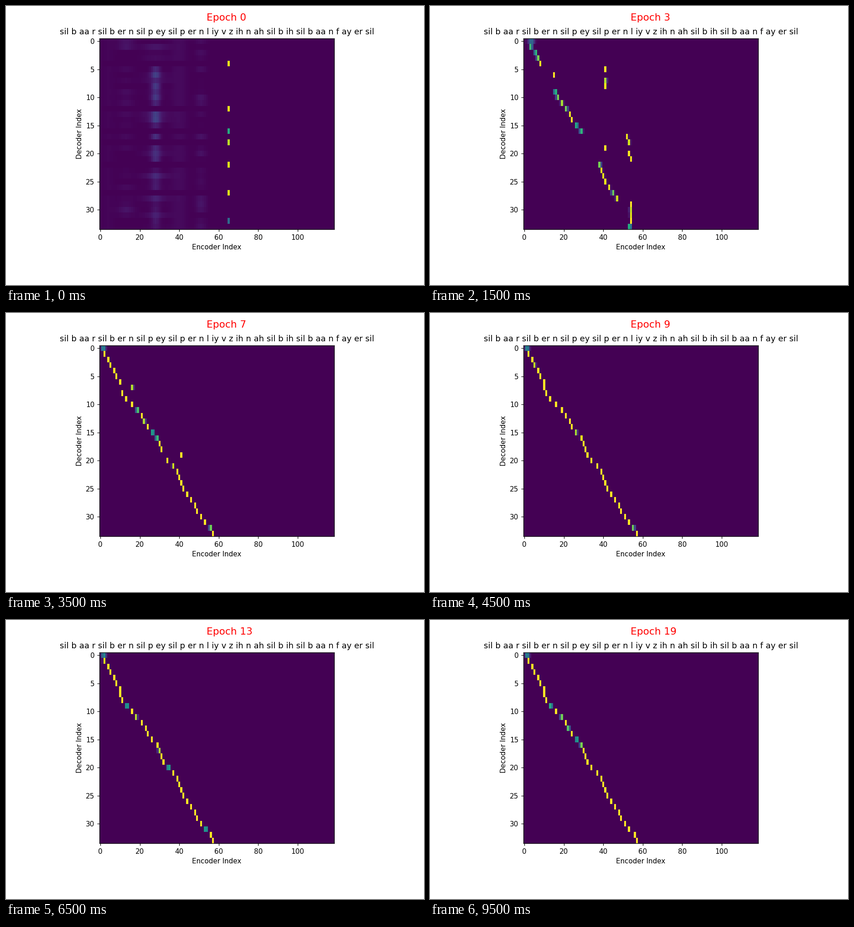
These frames come from a looping animation (917x611 px, 10000 ms). A matplotlib script:

```python
import numpy as np
import matplotlib.pyplot as plt
from matplotlib.animation import FuncAnimation

W, H, DPI = 917, 611, 100
ROWS, COLS, EPOCHS = 34, 119, 20
PHONES = ("sil b aa r sil b er n sil p ey sil p er n l iy v z ih n ah "
          "sil b ih sil b aa n f ay er sil")

plt.rcParams.update({
    "font.family": "DejaVu Sans", "font.size": 10.9,
    "axes.linewidth": 0.87, "axes.titlesize": 12.93, "axes.titlepad": 6.5,
    "axes.labelpad": 4.3,
    "xtick.major.size": 3.8, "ytick.major.size": 3.8,
    "xtick.major.pad": 3.8, "ytick.major.pad": 3.8,
    "xtick.major.width": 0.87, "ytick.major.width": 0.87,
})

rows = np.arange(ROWS)
cells = np.arange(COLS)

# The learned alignment bends at these (row, cell) points.
BENDS = [(0, 1.5), (1, 2), (2, 4), (5, 8), (6, 10), (7, 10), (8, 10.9),
         (12, 21), (14, 24.1), (16, 28.7), (19, 32), (22, 39), (25, 42),
         (28, 48), (29, 49), (32, 55.7), (33, 57)]
PATH = np.interp(rows, *zip(*BENDS))

# Cells that attract rows which have not found their place yet.
ANCHORS = np.array([16.4, 41, 53.3])

# Strong first guesses before training, all at one cell.
SPIKE_CELL = 65
SPIKES = {4: .97, 12: .97, 16: .62, 18: .9, 22: .95, 27: .95, 32: .35}


def bump(centre, sigma):
    return np.exp(-((cells - centre) / sigma) ** 2 / 2)


def untrained_map():
    rng = np.random.default_rng(4)
    free = np.array([SPIKES.get(r, 0) < 0.5 for r in rows])

    def band(centre, sigma, strength):
        return np.outer(strength * free, bump(centre, sigma))

    ridge = (rows > 3) * (0.23 - 0.005 * rows) * rng.uniform(0.2, 1, ROWS)
    grid = band(28, 1.6, ridge) + band(40, 3, 0.025) + band(4, 2.5, 0.012)
    for centre, sigma, peak in ((28, 5, .06), (13, 3, .06), (51, 2, .06)):
        grid += band(centre, sigma, peak * rng.random(ROWS) ** 2)
    for row, value in SPIKES.items():
        grid[row, SPIKE_CELL] = value
    return grid


def trained_map(epoch):
    rng = np.random.default_rng(epoch)
    tilt = 1.7 * np.exp(3 - epoch) * (1 - rows / 16)
    centres = PATH + tilt + rng.normal(0, 0.13, ROWS)

    # Groups of rows stray to an anchor ahead; the groups shrink with training.
    stray = np.abs(rows % 12 - 7) <= (7 - epoch) / 2
    ahead = np.searchsorted(ANCHORS, PATH)
    if epoch <= 3:
        ahead += rng.integers(0, 2, ROWS)
    pulled = ANCHORS[np.minimum(ahead, len(ANCHORS) - 1)]
    centres = np.where(stray, pulled + rng.normal(0, 0.5, ROWS), centres)

    sharpness = np.minimum(15, 0.4 * epoch ** 2 * rng.uniform(0.4, 3, ROWS))
    sharpness[0] /= 20
    offset = cells - centres[:, None]
    weight = np.exp(-sharpness[:, None] * offset ** 2)
    return weight / weight.sum(axis=1, keepdims=True)


def attention(epoch):
    if epoch == 0:
        return untrained_map()
    fade = 0.5 if epoch == 1 else 0
    return fade * untrained_map() + (1 - fade) * trained_map(epoch)


fig = plt.figure(figsize=(W / DPI, H / DPI), dpi=DPI, facecolor="white")
ax = fig.add_axes([205 / W, (H - 489) / H, 515 / W, 418 / H])
image = ax.imshow(attention(0), cmap="viridis", vmin=0, vmax=1,
                  aspect="auto", interpolation="nearest")
ax.set_xticks(range(0, 101, 20))
ax.set_yticks(range(0, 31, 5))
ax.set_xlabel("Encoder Index")
ax.set_ylabel("Decoder Index")
ax.set_title(PHONES)
label = fig.text(440 / W, (H - 31.5) / H, "", color="red", fontsize=15.6,
                 ha="left", va="baseline")


def update(epoch):
    image.set_data(attention(epoch))
    label.set_text(f"Epoch {epoch}")
    return image, label


anim = FuncAnimation(fig, update, frames=EPOCHS, interval=500, repeat=True,
                     repeat_delay=0, blit=False)
plt.show()
```
